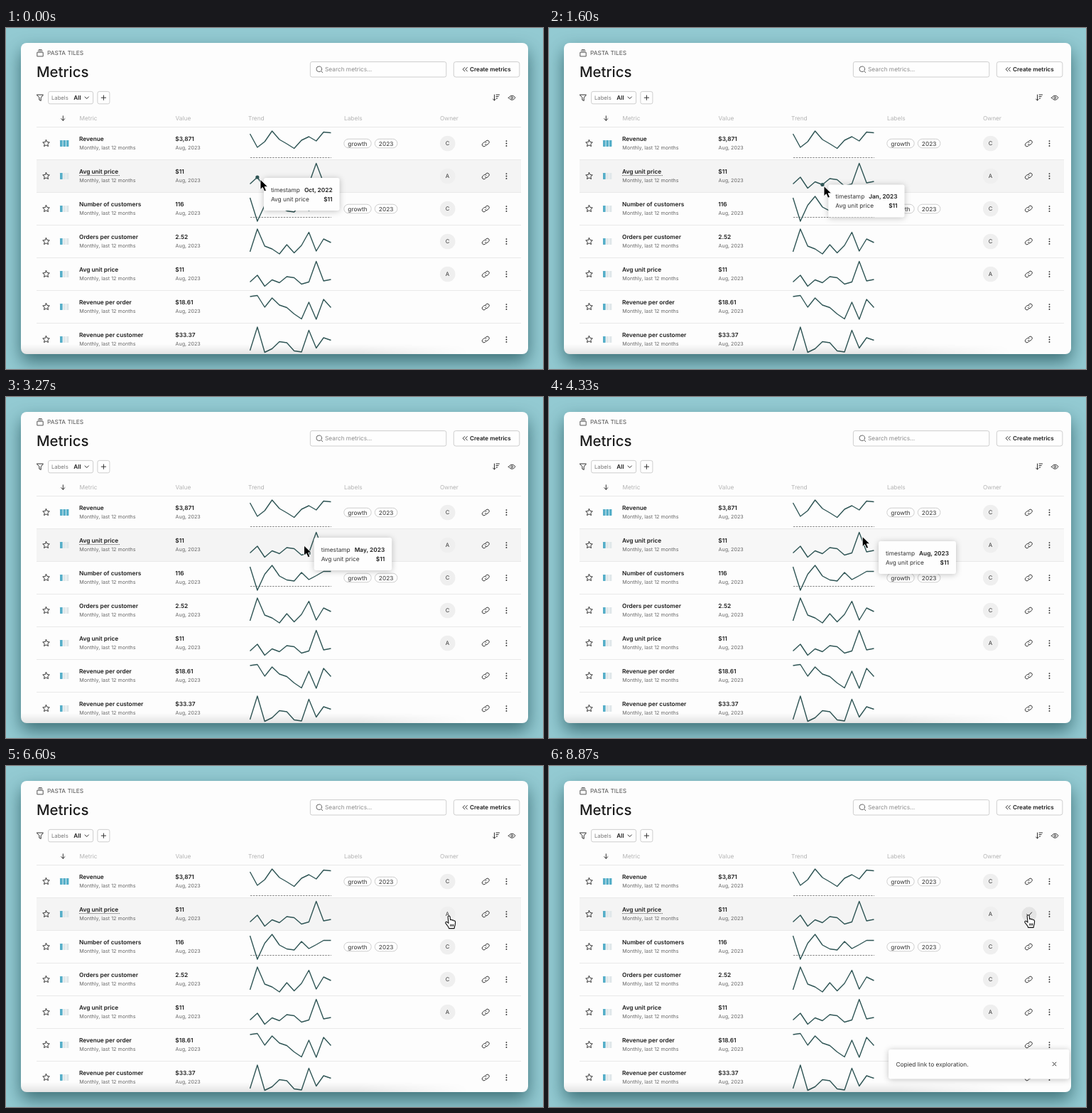
Animation of 756x480 px, one loop 8.94 s. Source, as an HTML page:

```html
<!DOCTYPE html>
<html lang="en">
<head>
<meta charset="utf-8">
<title>Metrics table</title>
<style>
  html, body { margin: 0; width: 100%; height: 100%; overflow: hidden; background: #93cad2; }
  #card {
    position: absolute; left: 21px; top: 21px; width: 714px; height: 438px; border-radius: 8px;
    background: #fdfdfd; box-shadow: 0 11px 24px rgba(12, 58, 64, .62);
  }
  svg { position: absolute; left: 0; top: 0; }
  text { font: 400 8.3px Inter, sans-serif; fill: #333; text-rendering: geometricPrecision; }
  .bold { font-weight: 600; fill: #1d1d1d; }
  .small { font-size: 7.15px; fill: #666; }
  .head { fill: #b4b4b4; }
  .mid { text-anchor: middle; }
  .end { text-anchor: end; }
  .line { fill: none; stroke: #333; stroke-width: 1; stroke-linecap: round; stroke-linejoin: round; }
  .trend { fill: none; stroke: #2f5555; stroke-width: 1.4; stroke-linejoin: round; }
  .box { fill: #fefefe; stroke: #c9c9c9; stroke-width: .9; }
  .rule { stroke: #e9e9e9; stroke-width: 1; }
  .float { filter: drop-shadow(0 1px 4px rgba(0, 0, 0, .24)); }
</style>
</head>
<body>
<div id="card"></div>
<svg id="stage" width="756" height="480" viewBox="0 0 756 480"></svg>
<script>
const LOOP = 8940, ROW = 46, TOP = 139.5;
const stage = document.getElementById('stage');
const $ = id => document.getElementById(id);

const text = (x, y, s, cls = '', extra = '') => `<text x="${x}" y="${y}" class="${cls}" ${extra}>${s}</text>`;
const path = (d, x = 0, y = 0, cls = 'line', extra = '') =>
  `<path class="${cls}" d="${d}" transform="translate(${x} ${y})" ${extra}/>`;
const box = (x, y, w, h, r, cls = 'box', extra = '') =>
  `<rect x="${x}" y="${y}" width="${w}" height="${h}" rx="${r}" class="${cls}" ${extra}/>`;
const rule = y => `<line x1="43" x2="725" y1="${y}" y2="${y}" class="rule"/>`;
const pointX = i => 343.5 + i * 10.36;

// Trend heights are relative to the top of each row.
const unitPrice = [34, 24.5, 40, 31, 35, 26.5, 28, 37, 34, 5, 32.5, 30.5];
const rows = [
  { name: 'Revenue', value: '$3,871', owner: 'C', chips: true, base: 43, bars: 3,
    trend: [9.5, 28.5, 20.5, 5.5, 17.5, 23.5, 30, 18.5, 13.5, 19.5, 7, 8] },
  { name: 'Avg unit price', value: '$11', owner: 'A', trend: unitPrice },
  { name: 'Number of customers', value: '116', owner: 'C', chips: true, base: 35,
    trend: [7.5, 40.5, 18, 5.5, 20.5, 26, 27.5, 15.5, 25.5, 20, 14, 14] },
  { name: 'Orders per customer', value: '2.52', owner: 'C',
    trend: [37.5, 5.5, 29.5, 33.5, 40.5, 27.5, 39, 28.5, 10, 36.5, 19.5, 24.5] },
  { name: 'Avg unit price', value: '$11', owner: 'A', trend: unitPrice },
  { name: 'Revenue per order', value: '$18.61',
    trend: [8.5, 7, 23.5, 10.5, 20.5, 24, 33, 40, 16.5, 40.5, 12.5, 24] },
  { name: 'Revenue per customer', value: '$33.37',
    trend: [38.5, 5.5, 41, 36, 26, 27.5, 39, 40.5, 10, 35, 20.5, 24] }
];

const star = 'M' + Array.from({ length: 10 }, (_, i) => {
  const a = i * Math.PI / 5, r = i % 2 ? 2.4 : 5;
  return `${(r * Math.sin(a)).toFixed(2)} ${(-r * Math.cos(a)).toFixed(2)}`;
}).join('L') + 'Z';
const link = 'M-.8 1.2A2.5 2.5 0 0 0 2.8 1.4L4.2 0A2.5 2.5 0 0 0 .7-3.6L-.2-2.8' +
  'M.8-1.2A2.5 2.5 0 0 0-2.8-1.4L-4.2 0A2.5 2.5 0 0 0-.7 3.6L.2 2.8';

function rowMarkup(row, i) {
  const y = TOP + i * ROW, mid = y + 23;
  let s = rule(y + ROW) + path(star, 56.5, mid);
  for (let b = 0; b < 3; b++)
    s += box(76 + b * 4.4, mid - 4.5, 3.6, 9, .4, '', `fill="${b < (row.bars || 1) ? '#55aec8' : '#e1e8ea'}"`);
  s += text(103, y + 19.5, row.name, 'bold') + text(103.3, y + 31.6, 'Monthly, last 12 months', 'small');
  s += text(238.3, y + 19.7, row.value, 'bold') + text(238.5, y + 31.6, 'Aug, 2023', 'small');
  if (row.base)
    s += path('M344 0H458', 0, y + row.base, '', 'stroke="#777" stroke-width=".9" stroke-dasharray="2.4 1.5"');
  s += path('M' + row.trend.map((v, k) => `${pointX(k)} ${v}`).join('L'), 0, y, 'trend');
  if (row.chips)
    s += box(475.8, mid - 6.3, 38.4, 12.6, 6.3) + text(495, mid + 3, 'growth', 'mid') +
         box(519.3, mid - 6.3, 31.6, 12.6, 6.3) + text(535.1, mid + 3, '2023', 'mid');
  if (row.owner)
    s += `<circle cx="621.7" cy="${mid}" r="10.8" fill="#efefef"/>` + text(621.5, mid + 2.8, row.owner, 'mid', 'style="font-size:7.8px"');
  s += path(link, 675.3, mid, 'line', i === 1 ? 'id="rowLink"' : '');
  for (const d of [-3.4, 0, 3.4]) s += `<circle cx="704.5" cy="${mid + d}" r=".95" fill="#222"/>`;
  return s;
}

const header =
  path('M-4-1.2H4V4.4H-4ZM-3-3.2H3M-2-5H2', 48.2, 35.5, 'line', 'style="stroke:#555"') +
  text(58, 38.2, 'PASTA TILES', '', 'fill-opacity=".85"') +
  text(43, 69.2, 'Metrics', '', 'style="font-size:20.4px;font-weight:500;fill:#1d1d1d"') +
  box(428.4, 47.6, 191.4, 21.4, 2.5) +
  path('M3 3L5 5M3.8 0A3.8 3.8 0 1 1-3.8 0A3.8 3.8 0 1 1 3.8 0', 440.8, 57.8, 'line', 'style="stroke:#666"') +
  text(449, 61.2, 'Search metrics...', '', 'style="fill:#8a8a8a"') +
  box(630.3, 47.6, 92.6, 21.4, 3) + path('M3-2.7L.4 0L3 2.7M-.6-2.7L-3.2 0L-.6 2.7', 646.4, 58.2) +
  text(653, 61.1, 'Create metrics', 'bold', 'style="font-size:8.15px"') +
  path('M-4.4-4H4.4L1.2.2V4.4L-1.2 3.2V.2Z', 48, 98) +
  box(59.6, 89.4, 63, 17.4, 2.5) + text(64, 101, 'Labels', '', 'style="font-size:7.7px;fill:#777"') +
  text(95.3, 101.2, 'All', 'bold') + path('M-2.6-1.3L0 1.4L2.6-1.3', 113.7, 98.2) +
  box(128.9, 89.4, 17, 17.4, 2.5) + path('M-3.2 0H3.2M0-3.2V3.2', 137.4, 98.1) +
  path('M-2.5-4V4M-4.4 2L-2.5 4L-.6 2M0-4H4.6M0-1.5H3.2M.4 1H1.8', 690, 98) +
  path('M-4.8 0Q0-6.4 4.8 0Q0 6.4-4.8 0ZM1.4 0A1.4 1.4 0 1 1-1.4 0A1.4 1.4 0 1 1 1.4 0', 712.3, 98.2) +
  path('M0-3.2V3.2M-2.6.7L0 3.2L2.6.7', 80.3, 127) +
  [[103.5, 'Metric'], [238.5, 'Value'], [341, 'Trend'], [476, 'Labels'], [611, 'Owner']]
    .map(([x, s]) => text(x, 129.8, s, 'head')).join('') + rule(TOP);

stage.innerHTML = `
  <defs>
    <clipPath id="clip">${box(21, 21, 714, 438, 8, '')}</clipPath>
    <linearGradient id="fade" x2="0" y2="1"><stop stop-opacity="0"/><stop offset="1" stop-opacity=".1"/></linearGradient>
    <linearGradient id="side"><stop offset=".75" stop-color="#fff"/><stop offset="1" stop-color="#000"/></linearGradient>
    <mask id="left">${box(21, 440, 630, 20, 0, '', 'fill="url(#side)"')}</mask>
  </defs>
  <g clip-path="url(#clip)">
    ${box(43, TOP + ROW, 682, ROW, 0, '', 'id="hover" fill="#f4f4f4"')}
    ${header}${rows.map(rowMarkup).join('')}
    ${path('M103.5 207.6H159.5', 0, 0, 'line', 'id="underline" style="stroke-dasharray:.1 1.9"')}
    <g id="copied"><circle cx="676" cy="208.8" r="10.5" fill="#e4e4e4"/>${path('M-3.4.2L-1 2.6L3.6-2.6', 676, 208.6)}</g>
    ${box(21, 445, 630, 14, 0, '', 'fill="url(#fade)" mask="url(#left)"')}
    <circle id="dot" r="2.6" fill="#2f5555"/>
    <g id="tip">
      ${box(0, 0, 110, 46, 3, 'float', 'id="tipBox" fill="#fefefe"')}
      ${text(10, 19.8, 'timestamp')}${text(10, 32.7, 'Avg unit price')}
      ${text(0, 19.8, '', 'bold end', 'id="month"')}${text(0, 32.7, '$11', 'bold end', 'id="price"')}
    </g>
    <g id="toast">
      ${box(478, 399, 254.5, 41.5, 3, 'float', 'fill="#fefefe"')}
      ${text(488.4, 422.6, 'Copied link to exploration.')}${path('M-2.4-2.4L2.4 2.4M2.4-2.4L-2.4 2.4', 711.5, 419.5)}
    </g>
  </g>
  <path id="arrow" d="M0 0V14.2L3.3 11.2L5.7 16.8L8.4 15.6L6 10.2H10.6Z" fill="#000" stroke="#fff" stroke-width=".9"/>
  <path id="hand" d="M-1.5 1.2Q0-.9 1.5 1.2L2 6Q3.5 4.8 4.6 6.4Q6 5.4 7 7.2Q8.6 6.6 9 8.6L8.7 13Q7.8 15.2 7.5 17.8H0Q-.5 15.6-2.4 13.6L-4.8 10.4Q-5 8-2.7 8.8L-.6 10.6Z
    M2.2 12V15M4.2 12V15M6.2 12V15" fill="#fff" stroke="#111" stroke-width="1.1" stroke-linejoin="round"/>`;

const clamp = v => Math.max(0, Math.min(1, v));
const smooth = v => v * v * (3 - 2 * v);
const ramp = (t, start, length) => smooth(clamp((t - start) / length));

// Interpolates [time, value, ...] keys, eased where asked.
function track(keys, t, ease = v => v) {
  let i = 1;
  while (i < keys.length - 1 && t > keys[i][0]) i++;
  const [a, b] = [keys[i - 1], keys[i]];
  const k = ease(clamp((t - a[0]) / (b[0] - a[0])));
  return a.slice(1).map((v, j) => v + (b[j + 1] - v) * k);
}

const cursorKeys = [
  [0, 358, 213.2], [1600, 387, 222.5], [3270, 419.5, 209], [4330, 441.2, 196.5], [4700, 450, 197.5],
  [6450, 623.6, 210.8], [7000, 623.6, 210.8], [7750, 674.6, 209.6], [LOOP, 674.6, 209.6]
];
const probeKeys = [[0, 356, 211], [1600, 386, 220.5], [3270, 425, 198], [4330, 455, 203], [4700, 458, 203]];
const months = ['Sep', 'Oct', 'Nov', 'Dec', 'Jan', 'Feb', 'Mar', 'Apr', 'May', 'Jun', 'Jul', 'Aug'];

function drawTooltip(t) {
  const [probeX, y] = track(probeKeys, t);
  const u = (probeX - pointX(0)) / 10.36;
  const k = Math.min(11, Math.floor(u + .5));
  const at = k - 1 + smooth(clamp((u + .5 - k) * 4));
  $('month').textContent = `${months[k]}, ${k < 4 ? 2022 : 2023}`;
  const width = 67 + $('month').getComputedTextLength();
  $('tipBox').setAttribute('width', width);
  for (const id of ['month', 'price']) $(id).setAttribute('x', width - 10);
  $('tip').setAttribute('transform', `translate(${pointX(at) + 9.3 - at * .25} ${y})`);
  $('tip').setAttribute('opacity', 1 - ramp(t, 4450, 150));
  $('dot').setAttribute('transform', `translate(${pointX(k)} ${TOP + ROW + unitPrice[k]})`);
  $('dot').setAttribute('opacity', t < 4250 ? 1 : 0);
}

function draw(t) {
  drawTooltip(t);
  const [x, y] = track(cursorKeys, t, t > 4700 ? smooth : undefined);
  const pointing = Math.abs(x - 621.7) < 11 || x > 664;
  for (const [id, on] of [['hand', pointing], ['arrow', !pointing]]) {
    $(id).setAttribute('transform', `translate(${x} ${y})`);
    $(id).setAttribute('opacity', +on);
  }
  const away = t > 4250 && t < 4800;
  $('underline').setAttribute('opacity', away ? 0 : 1);
  $('hover').setAttribute('fill', away ? '#f7f7f7' : '#f4f4f4');
  const copied = t >= 7900;
  $('copied').setAttribute('opacity', +copied);
  $('rowLink').setAttribute('opacity', +!copied);
  const shown = ramp(t, 8220, 250);
  $('toast').setAttribute('opacity', shown);
  $('toast').setAttribute('transform', `translate(0 ${12 * (1 - shown)})`);
}

const start = performance.now();
function tick() {
  draw((performance.now() - start) % LOOP);
  requestAnimationFrame(tick);
}
tick();
</script>
</body>
</html>
```
